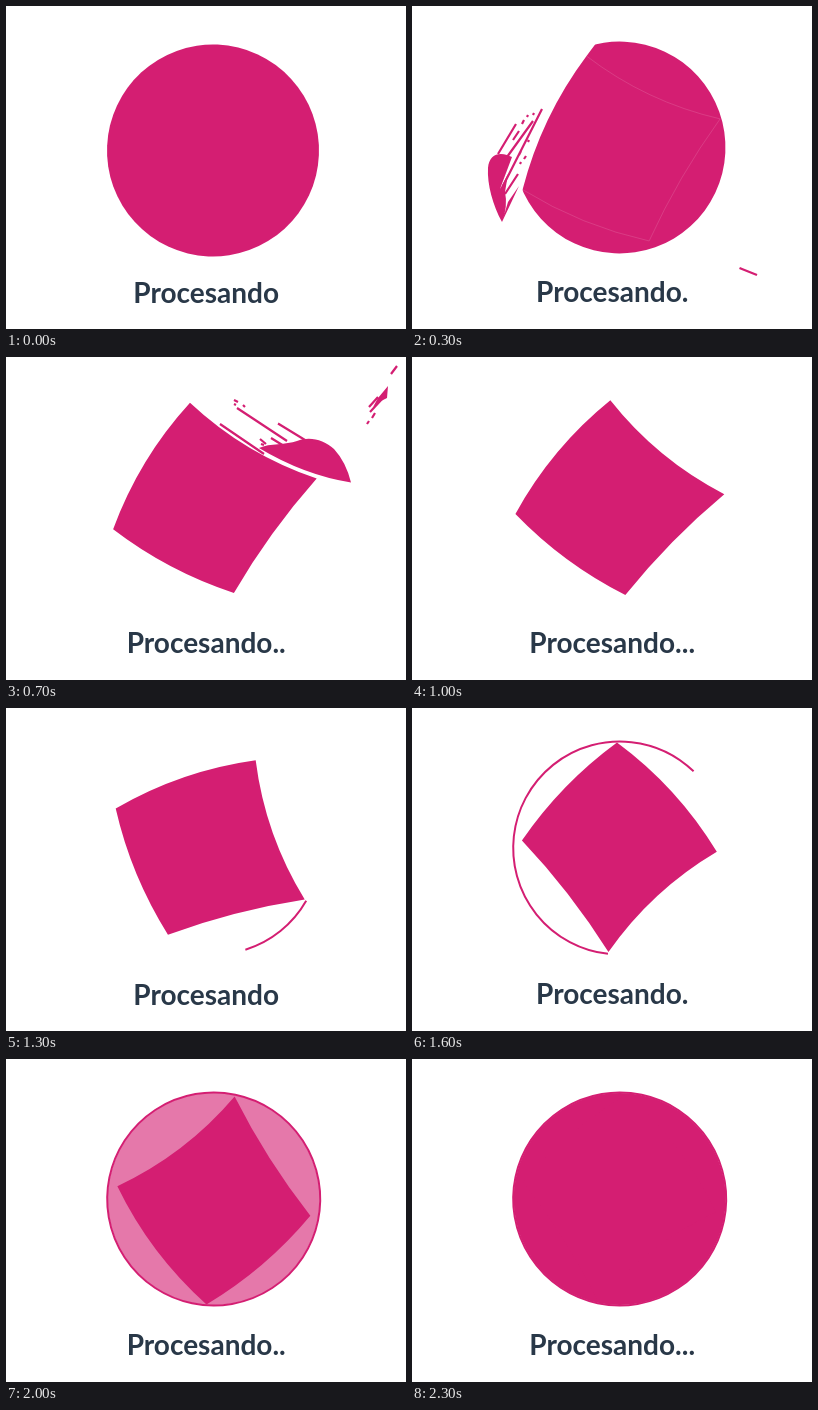
Recreate the animation shown at these times as an HTML page with a canvas. Size 400 px wide and 323 px high, loop 2400 ms.

```html
<!DOCTYPE html>
<html lang="es">
<head>
<meta charset="utf-8">
<title>Procesando</title>
<style>
html, body { margin: 0; width: 100%; height: 100%; overflow: hidden; background: #fff; }
canvas { display: block; width: 400px; height: 323px; }
</style>
</head>
<body>
<canvas id="stage" width="400" height="323"></canvas>
<script>
const ctx = document.getElementById('stage').getContext('2d');
const PINK = '#d41e72', INK = '#293848';
const LOOP = 2400, STEP = 100, RAD = Math.PI / 180;
const CX = 207.7, CY = 140;

// Tile corners around the centre, and how far each side bows outward.
const corners = [[104.4, 7], [-3.6, 98], [-105.4, 7], [-0.2, -97.2]];
const bows = [-3.5, 5.8, 7.3, -8];
const RIGHT = 0, BOTTOM = 1;

// Turn keys: [step, degrees, degrees per step]
const turns = [[0, -20, 0], [3, -19.7, 0.5], [7, -14, 3.5], [13, 25.7, 18.5],
  [18, 167.6, 47.5], [20, 277.7, 57], [24, 520, 62]];

// Flying offcuts: visible steps, solid part, streaks, offset after k steps.
const chips = [
  { from: 3, to: 6,
    solid: 'M90 216C81 200 75 178 76 162C77 149 86 146 95 149L100 151L88 183L96 168L93 186Q96 200 90 216ZM90 216L107 180L96 196Z',
    streaks: 'M86 148L104 118M91 180L130 103M95 151L121 115M93 188L106 168M101 134L107 125M110 118L112 114M115 111L116 109M121 109L122 107M116 136L117 134M107 149L109 145M112 153L114 150M108 158L109 156',
    move: k => [-16.7 * k, 32.3 * k] },
  { from: 5, to: 6,
    solid: 'M281 258C255 266 222 262 208 247L222 249L214 243Q245 255 281 258Z',
    streaks: 'M140 215L205 241M165 217L214 240M160 234L208 252M128 208L132 210M150 226L154 228',
    move: k => [30 * k, 10 * k] },
  { from: 7, to: 8,
    solid: 'M382 29L381 41L375 44L367 50L372 41Z',
    streaks: 'M385 17L391 9M363 50L372 40M364 55L377 41M366 61L369 56M361 67L363 64',
    move: k => [45 * k, -80 * k] },
  { from: 7, to: 10,
    solid: 'M253 91C264 86 280 88 291 84C304 79 318 83 328 92Q340 105 345 125.5Q298 118 253 91Z',
    streaks: 'M231 51L281 84M214 67L258 97M272 66.5L299 83M265 81L278 89M254 82L260 87M255 87L258 88M228 43L232 45M228 47L230 48M237 48L239 50',
    move: k => [36 * k + 10 * k * k, 18 * k + 5 * k * k] }
].map(c => ({ ...c, solid: new Path2D(c.solid), streaks: new Path2D(c.streaks) }));

function turnAt(u) {
  let i = 0;
  while (i < turns.length - 2 && u >= turns[i + 1][0]) i++;
  const [t0, a, va] = turns[i], [t1, b, vb] = turns[i + 1];
  const d = t1 - t0, s = (u - t0) / d, s2 = s * s, s3 = s2 * s;
  return a * (2 * s3 - 3 * s2 + 1) + va * d * (s3 - 2 * s2 + s)
    + b * (3 * s2 - 2 * s3) + vb * d * (s3 - s2);
}

function side(i) {
  const p = corners[i], q = corners[(i + 1) % 4];
  const dx = q[0] - p[0], dy = q[1] - p[1], len = Math.hypot(dx, dy);
  const n = [dy / len, -dx / len];
  const c = [(p[0] + q[0]) / 2 + n[0] * bows[i] * 2, (p[1] + q[1]) / 2 + n[1] * bows[i] * 2];
  return { p, q, c, n };
}

function tile() {
  ctx.beginPath();
  ctx.moveTo(...corners[0]);
  for (let i = 0; i < 4; i++) {
    const { c, q } = side(i);
    ctx.quadraticCurveTo(...c, ...q);
  }
  ctx.closePath();
  ctx.fill();
}

// Area beyond one side, its curve prolonged along the tangents.
function beyond(i) {
  const { p, q, c, n } = side(i);
  const past = e => [e[0] + (e[0] - c[0]) * 0.6, e[1] + (e[1] - c[1]) * 0.6];
  const a = past(p), b = past(q);
  ctx.beginPath();
  ctx.moveTo(...a);
  ctx.lineTo(...p);
  ctx.quadraticCurveTo(...c, ...q);
  ctx.lineTo(...b);
  ctx.lineTo(b[0] + n[0] * 130, b[1] + n[1] * 130);
  ctx.lineTo(a[0] + n[0] * 130, a[1] + n[1] * 130);
  ctx.closePath();
}

function disc(r) {
  ctx.beginPath();
  ctx.arc(0, 0, r, 0, Math.PI * 2);
  ctx.fill();
}

function seam(i) {
  const { p, q, c } = side(i);
  ctx.strokeStyle = 'rgba(255,255,255,.15)';
  ctx.lineWidth = 0.8;
  ctx.beginPath();
  ctx.moveTo(...p);
  ctx.quadraticCurveTo(...c, ...q);
  ctx.stroke();
}

function slice(i, x, y, dx, dy, turn) {
  ctx.save();
  ctx.translate(x + dx, y + dy);
  ctx.rotate(turn);
  beyond(i);
  ctx.clip();
  disc(106);
  ctx.restore();
}

function line(x1, y1, x2, y2) {
  ctx.strokeStyle = PINK;
  ctx.lineWidth = 2.2;
  ctx.beginPath();
  ctx.moveTo(x1, y1);
  ctx.lineTo(x2, y2);
  ctx.stroke();
}

function cutting(u, turn) {
  const settle = Math.max(0, 1 - u / 4.5);
  const x = CX - 0.7 * settle, y = CY + 4.5 * settle;
  const gone = [u >= 6, u >= 4, u >= 3, u >= 7];
  ctx.save();
  ctx.translate(x, y);
  ctx.rotate(turn);
  if (gone.every(Boolean)) {
    tile();
  } else {
    disc(106);
    for (let i = 0; i < 4; i++) {
      if (gone[i]) {
        ctx.fillStyle = '#fff';
        beyond(i);
        ctx.fill();
      } else if (u >= 2) {
        seam(i);
      }
    }
  }
  ctx.restore();

  ctx.fillStyle = PINK;
  if (u === 4) slice(BOTTOM, x, y, 12, 6, turn);
  if (u === 6) slice(RIGHT, x, y, 14, -25, turn);
  if (u === 1) line(191, 23, 203, 1);
  if (u === 3) line(327.5, 262, 345, 269);

  ctx.strokeStyle = PINK;
  ctx.lineWidth = 2.2;
  for (const c of chips) {
    if (u < c.from || u > c.to) continue;
    ctx.save();
    ctx.translate(...c.move(u - c.from));
    ctx.fill(c.solid);
    ctx.stroke(c.streaks);
    ctx.restore();
  }
}

function spinning(u, turn) {
  const alpha = Math.min(1, Math.max(0, (u - 16) * 0.15));
  const sweep = Math.min(360, Math.max(0, 43 + 58.2 * (u - 13)));
  ctx.save();
  ctx.translate(CX, CY);
  ctx.globalAlpha = alpha;
  disc(106);
  ctx.globalAlpha = 1;
  if (sweep > 0) {
    const start = turn + 4 * RAD;
    ctx.strokeStyle = PINK;
    ctx.lineWidth = 2;
    ctx.beginPath();
    ctx.arc(0, 0, 106.5, start, start + sweep * RAD);
    ctx.stroke();
  }
  ctx.rotate(turn);
  tile();
  ctx.restore();
}

function label(u) {
  const dots = Math.floor(u / 3) % 4;
  ctx.font = '700 28px Lato, sans-serif';
  ctx.textAlign = 'center';
  ctx.textBaseline = 'alphabetic';
  ctx.fillStyle = INK;
  ctx.fillText('Procesando' + '.'.repeat(dots), 200.2, dots ? 296 : 297);
}

function draw(now) {
  const u = Math.floor((now % LOOP) / STEP);
  const turn = turnAt(u) * RAD;
  ctx.fillStyle = '#fff';
  ctx.fillRect(0, 0, 400, 323);
  ctx.fillStyle = PINK;
  if (u < 12) cutting(u, turn);
  else spinning(u, turn);
  label(u);
}

let begin = null;
function tick(now) {
  if (begin === null) begin = now;
  draw(now - begin);
  requestAnimationFrame(tick);
}
draw(0);
requestAnimationFrame(tick);
</script>
</body>
</html>
```
